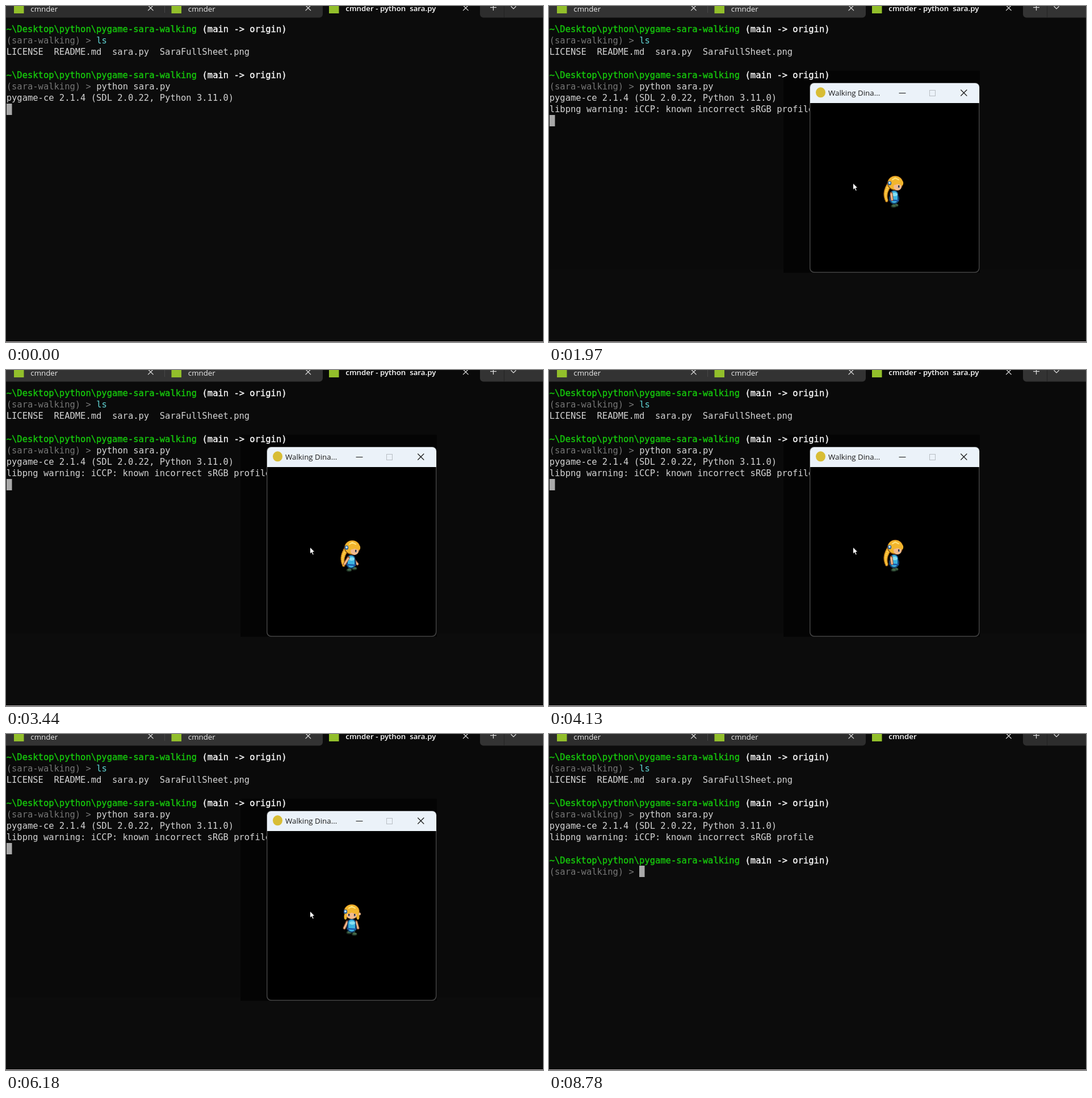
Animation, 946 px wide and 592 px high, one loop 8.8 s. Source, as an HTML page with a canvas:

```html
<!DOCTYPE html>
<html lang="en">
<head>
<meta charset="utf-8">
<title>Terminal and walking sprite</title>
<style>
html, body { margin: 0; width: 100%; height: 100%; overflow: hidden; background: #0c0c0c; }
canvas { display: block; }
</style>
</head>
<body>
<canvas id="stage" width="946" height="592"></canvas>
<script>
const ctx = document.getElementById('stage').getContext('2d');
const LOOP = 8800, OPEN = 280, STEP = 135.4, BLINK = 530;
const CHAR = 9.32, LINE = 20.17;
const MONO = '15.48px "DejaVu Sans Mono", monospace';
const UI = '"Open Sans", sans-serif';
const GREEN = '#16c60c', GREY = '#767676', TEXT = '#d4d4d4', WHITE = '#f6f6f6';
const HAIR = '#f2b52d', HAIR_DARK = '#7c460e', SKIN = '#f2ba8e', SKIN_DARK = '#8f4f2c';
const TURN = 29, FADE_OUT = 45, CLOSED = 46;

function rect(color, x, y, w, h) {
  ctx.fillStyle = color;
  ctx.fillRect(x, y, w, h);
}

function round(color, x, y, w, h, radii) {
  ctx.fillStyle = color;
  ctx.beginPath();
  ctx.roundRect(x, y, w, h, radii);
  ctx.fill();
}

function oval(color, x, y, rx, ry) {
  ctx.fillStyle = color;
  ctx.beginPath();
  ctx.ellipse(x, y, rx, ry, 0, 0, Math.PI * 2);
  ctx.fill();
}

function line(color, width, ...points) {
  ctx.beginPath();
  points.forEach(([x, y]) => ctx.lineTo(x, y));
  ctx.strokeStyle = color;
  ctx.lineWidth = width;
  ctx.stroke();
}

function cross(color, x, y, r) {
  for (const side of [-1, 1]) line(color, 1.2, [x - r, y - r * side], [x + r, y + r * side]);
}

function label(text, x, y, color, font) {
  ctx.font = font;
  ctx.fillStyle = color;
  ctx.fillText(text, x, y);
}

function term(row, col, text, color = TEXT, strong = false) {
  const x = 0.7 + col * CHAR, y = 46 + row * LINE;
  label(text, x, y, color, MONO);
  if (strong) {
    ctx.strokeStyle = color;
    ctx.lineWidth = 0.4;
    ctx.strokeText(text, x, y);
  }
}

function prompt(row, command = '', color = TEXT) {
  term(row, 0, '~\\Desktop\\python\\pygame-sara-walking', GREEN, true);
  term(row, 37, '(main -> origin)', WHITE, true);
  term(row + 1, 0, '(sara-walking) >', GREY);
  term(row + 1, 17, command, color);
}

function drawTabs(focused, running) {
  const bar = focused ? '#2d2d2d' : '#333333';
  round(bar, -8, -8, 566, 28.5, [0, 0, 6, 0]);
  round(bar, 835, -8, 120, 28.5, [0, 0, 0, 6]);
  rect('#474747', 279, 0, 1, 12);
  rect('#222222', 877, 0, 1, 20);
  for (let i = 0; i < 3; i++) {
    const x = 14 + i * 277.5, active = i === 2;
    rect('#92bf2b', x, -4, 17.5, 17);
    const title = active && running ? 'cmnder - python  sara.py' : 'cmnder';
    label(title, x + 29.3, active ? 8.5 : 9.5, active ? '#ffffff' : '#ececec', `${active ? 600 : 400} 13.3px ${UI}`);
    cross('#e4e4e4', x + 240.8, 3.5, 4.7);
  }
  line('#e4e4e4', 1.2, [853, 2.5], [864, 2.5]);
  line('#e4e4e4', 1.2, [858.5, -3], [858.5, 8]);
  line('#e4e4e4', 1.2, [889.5, 0.5], [894, 5], [898.5, 0.5]);
}

function drawTerminal(warned, closed, cursorOn) {
  prompt(0, 'ls', '#61d6d6');
  term(2, 0, 'LICENSE  README.md  sara.py  SaraFullSheet.png');
  prompt(4, 'python sara.py');
  term(6, 0, 'pygame-ce 2.1.4 (SDL 2.0.22, Python 3.11.0)');
  if (warned) term(7, 0, 'libpng warning: iCCP: known incorrect sRGB profile');
  if (closed) prompt(9);
  const row = closed ? 10 : warned ? 8 : 7;
  if (cursorOn) rect('#a9a9a9', closed ? 159 : 1, Math.round(30.7 + row * LINE), 9.5, 20);
}

function drawLeg(x, lift) {
  line('#35563a', 4, [x / 2, -9], [x, -3 - lift]);
  oval('#1d3022', x, -2 - lift, 4.8, 3);
  oval('#4a6f4e', x + 0.5, -2.6 - lift, 3.4, 1.7);
}

function drawArm(shoulder, hand) {
  line(SKIN_DARK, 5, [shoulder, -25], [hand, -14]);
  line(SKIN, 3, [shoulder, -24], [hand, -14]);
}

function drawDress() {
  line('#12406f', 15, [0, -23], [0, -14]);
  line('#12406f', 18, [0, -16], [0, -15]);
  line('#3cb4e0', 12, [0, -23], [0, -14]);
  oval('#86dff2', 1, -23, 5, 3);
  line('#1b57a8', 2.5, [-7, -13], [7, -12]);
}

function drawPonytail() {
  for (const [color, grow] of [[HAIR_DARK, 1], [HAIR, 0], ['#ffd75a', -2]]) {
    for (let p = 0; p <= 1; p += 0.1) {
      oval(color, -6 - 9 * Math.sin(p * 2.2), -44 + p * 31, Math.max(0.5, 4.5 - 2.5 * p + grow), 3 + grow);
    }
  }
}

// Local axes: feet at y = 0, the body's centre line at x = 0.
function drawHead(front) {
  const x = front ? 0 : 2, faceX = front ? 0 : 6;
  oval(HAIR_DARK, x, -43, 14, 13);
  oval(HAIR, x, -43.5, 13, 11.8);
  if (front) for (const side of [-1, 1]) oval(HAIR, side * 11, -34, 2.5, 5);
  oval(SKIN, faceX, -37, front ? 9 : 7, 7);
  for (let i = -2; i <= 2; i++) oval(HAIR, faceX + i * 3.6, -45 + Math.abs(i), 3, 4);
  line('#ffe580', 2, [x - 5, -49], [x, -52], [x + 6, -49]);
  for (const eyeX of front ? [-5, 5] : [8]) {
    rect('#2a2634', eyeX - 1, -39, 2.4, 4);
    rect('#3c7fb8', eyeX, -37, 1.4, 2);
  }
  if (front) oval(SKIN, 14, -39, 2, 2.5);
  oval('#215b9e', front ? -11 : -8, -43, 3.2, 3.6);
  oval('#c8eef8', front ? -11 : -8, -43.5, 1.8, 2);
}

function drawWalker(step) {
  const swing = Math.sin((step % 8 - 4.5) * Math.PI / 4);
  const front = step >= TURN;
  ctx.save();
  ctx.lineJoin = 'round';
  ctx.lineCap = 'round';
  ctx.translate(front ? 609 : 608, 354.5);
  for (const side of [-1, 1]) drawLeg(front ? side * 4.7 : side * swing * 5 + 1, Math.max(0, side * swing) * 3);
  ctx.translate(0, Math.abs(swing) * 1.5);
  if (!front) drawPonytail();
  drawArm(front ? 8 : 2, front ? 12 + swing : swing * 12);
  if (front) drawArm(-8, -12 + swing);
  drawDress();
  if (!front) drawArm(-5, -6 - swing * 6);
  drawHead(front);
  ctx.restore();
}

function drawWindow(step) {
  ctx.save();
  if (step < 1 || step === FADE_OUT) {
    ctx.globalAlpha = 0.45;
    ctx.translate(609, 302);
    ctx.scale(0.94, 0.94);
    ctx.translate(-609, -302);
  }
  round('#424242', 459, 135, 299.5, 335, 8);
  round('#000000', 460.5, 137, 296.5, 331.5, 7);
  round('#ebf2f9', 460, 136, 298, 35, [7, 7, 0, 0]);
  oval('#d8bd35', 478.5, 152.3, 8.5, 9);
  label('Walking Dina...', 492, 158, '#1c1c1c', `13.3px ${UI}`);
  line('#222222', 1.1, [616.5, 153.5], [628.5, 153.5]);
  ctx.strokeStyle = '#b8bec4';
  ctx.lineWidth = 1;
  ctx.strokeRect(670.5, 148.5, 10, 10);
  cross('#1c1c1c', 730.8, 153, 5.5);
  if (step >= 1) drawWalker(step);
  ctx.restore();
}

function drawPointer(t, closed) {
  const moved = Math.max(0, Math.floor((t - 7660) / STEP) + 1) / 6;
  if (t < OPEN || moved > 1) return;
  const ease = moved * moved * (3 - 2 * moved);
  ctx.save();
  ctx.translate((closed ? 537 : 535.5) + 78 * ease, 312 + 128 * ease);
  const arrow = new Path2D('M0 0V12L2.8 9.6L4.7 14L6.8 13L5 8.9L8.5 8.6Z');
  ctx.fillStyle = '#ffffff';
  ctx.strokeStyle = '#000000';
  ctx.lineWidth = 1;
  ctx.fill(arrow);
  ctx.stroke(arrow);
  ctx.restore();
}

function draw(t) {
  const step = Math.floor((t - 322) / STEP);
  const closed = step >= CLOSED;
  const open = t >= OPEN && !closed;
  const cursorOn = t < 7130 || Math.floor((t - 7130) / BLINK) % 2 === 1;

  rect('#0c0c0c', 0, 0, 946, 592);
  if (open) {
    rect('#0a0a0a', 0, 0, 946, 464);
    rect('#040404', 413, 114, 346, 356);
  }
  drawTabs(!open, !closed);
  drawTerminal(step >= 1, closed, cursorOn);
  if (open) drawWindow(step);
  drawPointer(t, closed);
  rect('#b9b1b4', 0, 591, 946, 1);
}

function tick(now) {
  draw(now % LOOP);
  requestAnimationFrame(tick);
}
requestAnimationFrame(tick);
</script>
</body>
</html>
```
